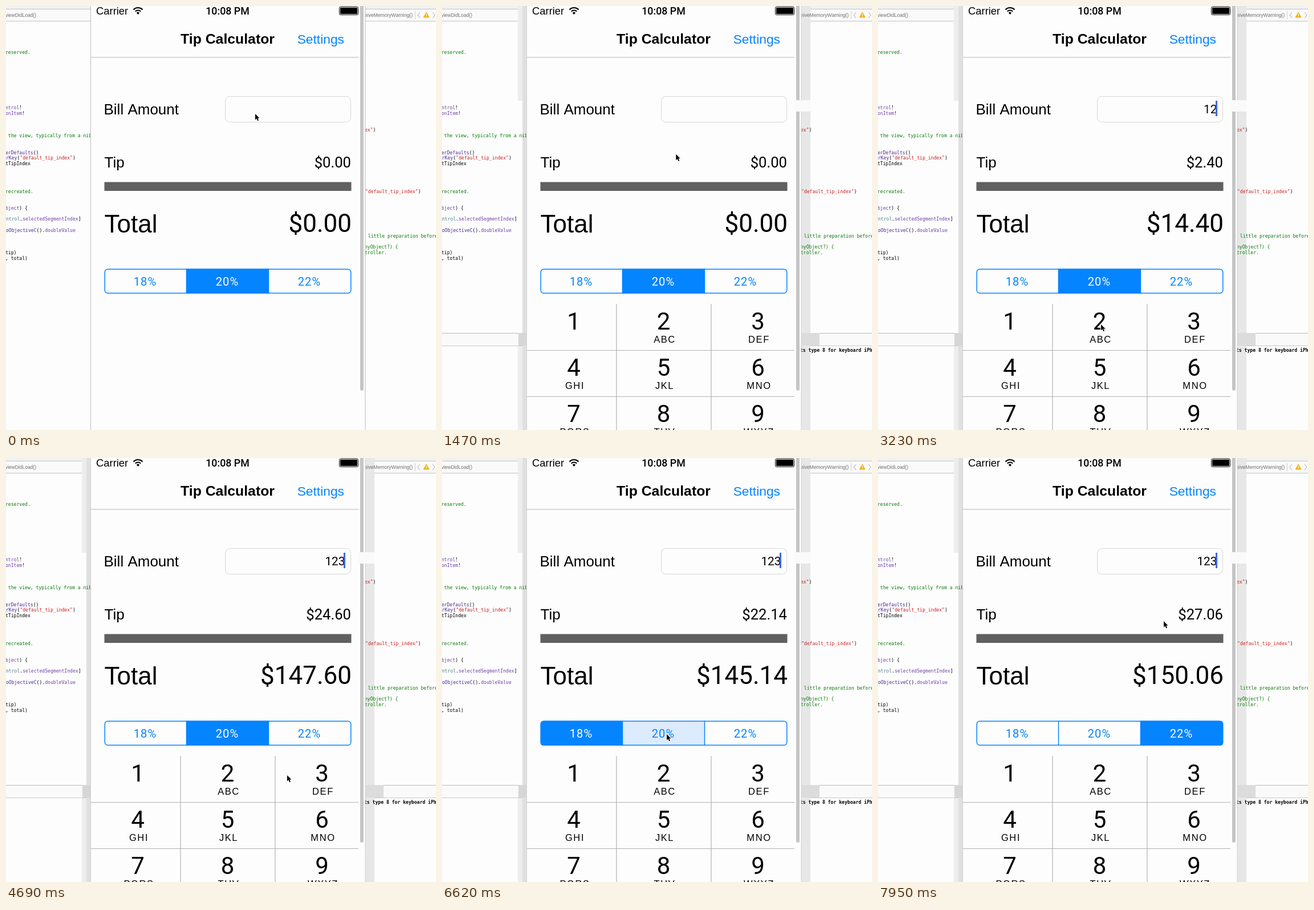
Write an HTML page with a canvas that moves like this. It is 754 px wide and 743 px high and loops after 8 s.

```html
<!DOCTYPE html>
<html lang="en">
<head>
<meta charset="utf-8">
<title>Tip Calculator</title>
<style>
html, body { margin: 0; width: 100%; height: 100%; overflow: hidden; background: #fdfdfd; }
canvas { display: block; }
</style>
</head>
<body>
<canvas id="stage" width="754" height="743"></canvas>
<script>
const c = document.getElementById('stage').getContext('2d');
const LOOP = 8000, STEP = 147.1;
const SANS = '"Liberation Sans", Arial, sans-serif';
const DIGITS = 'Roboto, sans-serif';
const MONO = '"DejaVu Sans Mono", monospace';
const PAPER = '#fdfdfd', BLUE = '#0584ff', BLACK = '#000';
const GREEN = '#0a7a0a', PURPLE = '#4a2796', LILAC = '#7040a8', RED = '#c82020';

// Pointer stops: time, x, y
const POINTER = [
  [0, 437, 189], [147, 438, 189], [441, 438, 189], [588, 450, 185], [1180, 450, 185],
  [2200, 249, 563], [2500, 249, 563], [2790, 391, 558], [3400, 391, 558],
  [4300, 493, 556], [4710, 493, 556], [5740, 272, 484], [5880, 245, 484],
  [6180, 245, 484], [6520, 394, 484], [6800, 394, 484], [7200, 533, 484],
  [7360, 533, 484], [7940, 501, 286]
];
const FOCUS = 5;
const KEY_DOWN = [16, 21, 31], KEY_UP = [17, 22, 32];
const TAP_DOWN = [41, 45, 49], TAP_UP = [42, 46, 50];
const RATES = [18, 20, 22];

// Code lines: x, y, then text and colour pairs
const CODE = [
  [-1, 81, 'reserved.', GREEN],
  [-1, 178, 'ntrol', LILAC, '!', BLACK],
  [-1, 188, 'onItem', LILAC, '!', BLACK],
  [-1, 227, ' the view, typically from a nib.', GREEN],
  [-1, 257, 'erDefaults', PURPLE, '()', BLACK],
  [0, 266, 'rKey', PURPLE, '(', BLACK, '"default_tip_index"', RED, ')', BLACK],
  [-1, 276, 'tTipIndex', BLACK],
  [-1, 325, 'recreated.', GREEN],
  [-1, 354, 'bject', LILAC, ') {', BLACK],
  [0, 373, 'ntrol', '#4f8187', '.', BLACK, 'selectedSegmentIndex', LILAC, ']', BLACK],
  [0, 393, 'oObjectiveC', PURPLE, '().', BLACK, 'doubleValue', LILAC],
  [-1, 432, 'tip)', BLACK],
  [-1, 442, ', total)', BLACK],
  [629, 217, 'ex"', RED, ')', BLACK],
  [630, 325, '"default_tip_index"', RED, ')', BLACK],
  [630, 403, ' little preparation before', GREEN],
  [629, 422, 'nyObject?) {', GREEN],
  [629, 432, 'troller.', GREEN]
];

function box(x, y, w, h, color) {
  c.fillStyle = color;
  c.fillRect(x, y, w, h);
}

function text(str, x, y, size, { color = BLACK, align = 'left', weight = '', space = 0, font = SANS } = {}) {
  c.font = `${weight} ${size}px ${font}`;
  c.textAlign = align;
  c.letterSpacing = space + 'px';
  c.fillStyle = color;
  c.fillText(str, x, y);
}

function path(points, x = 0, y = 0) {
  c.beginPath();
  for (const [px, py] of points) c.lineTo(x + px, y + py);
}

function roundBox(x, y, w, h, r) {
  c.beginPath();
  c.roundRect(x, y, w, h, r);
}

function drawEditor(open) {
  for (const [x, w] of [[0, 148], [629, 125]]) {
    box(x, 0, w, 5, '#f1f1f1');
    box(x, 5, w, 1, '#c4c4c4');
    box(x, 6, w, 20, '#fafafa');
    box(x, 26, w, 1, '#c2c2c2');
    if (open) {
      box(x, 573, w, 1, '#b9b9b9');
      box(x, 574, w, 21, '#fafafa');
      box(x, 595, w, 1, '#c9c9c9');
    }
  }
  if (open) {
    box(133, 0, 8, 166, '#ededed');
    box(141, 0, 8, 743, '#e0e0e0');
    box(134, 573, 14, 22, '#d6d6d6');
    box(133, 596, 8, 147, '#ededed');
    box(630, 0, 16, 165, '#e7e7e7');
    box(630, 185, 16, 558, '#e7e7e7');
    box(630, 573, 32, 22, '#dcdcdc');
    text('ts type 8 for keyboard iPhone', 628, 606, 8.1, { weight: 'bold', font: MONO });
  }
  text('viewDidLoad()', 53, 19, 8.5, { color: '#6e6e6e', align: 'right' });
  text('didReceiveMemoryWarning()', 713, 19, 8.6, { color: '#6e6e6e', align: 'right' });
  box(717, 9, 1, 14, '#d0d0d0');
  c.strokeStyle = '#a8a8a8';
  c.lineWidth = 1;
  path([[726, 11], [722, 16], [726, 21]]);
  c.stroke();
  path([[748, 11], [752, 16], [748, 21]]);
  c.stroke();
  path([[737, 11], [742, 20], [732, 20]]);
  c.closePath();
  c.fillStyle = c.strokeStyle = '#f5b400';
  c.lineJoin = 'round';
  c.fill();
  c.stroke();
  box(736.5, 13.5, 1.2, 3.5, '#fff');
  box(736.5, 18, 1.2, 1.2, '#fff');

  for (const [x, y, ...runs] of CODE) {
    let left = x;
    for (let i = 0; i < runs.length; i += 2) {
      text(runs[i], left, y + 3, 8.1, { color: runs[i + 1], font: MONO });
      left += c.measureText(runs[i]).width;
    }
  }
}

function drawPhone(open) {
  box(148, 0, 482, 743, PAPER);
  box(148, 0, 1, 743, open ? '#d2d2d2' : '#bcbcbc');
  box(629.5, 0, 1, 743, open ? '#d2d2d2' : '#bcbcbc');
  c.fillStyle = '#c5c5c5';
  roundBox(621, -10, 6, 684, 3);
  c.fill();
  if (open) box(618, 165, 28, 20, '#fafafa');

  text('Carrier', 158, 15, 18.4);
  text('10:08 PM', 388.5, 15, 17.8, { weight: 500, align: 'center', font: DIGITS });
  c.strokeStyle = BLACK;
  c.lineWidth = 2.2;
  for (const r of [6.5, 11]) {
    c.beginPath();
    c.arc(231.5, 14, r, -Math.PI * 0.76, -Math.PI * 0.24);
    c.stroke();
  }
  c.beginPath();
  c.moveTo(231.5, 15);
  c.arc(231.5, 14, 3.4, -Math.PI * 0.78, -Math.PI * 0.22);
  c.fillStyle = BLACK;
  c.fill();
  c.lineWidth = 1;
  roundBox(584.5, 1.5, 33, 14, 2);
  c.stroke();
  box(586, 3, 30, 11, BLACK);

  text('Tip Calculator', 388.5, 65.5, 24.8, { weight: 'bold', align: 'center' });
  text('Settings', 593, 65.5, 22.8, { color: BLUE, align: 'right' });
  box(149, 89.5, 469, 1, '#b4b4b4');
}

function drawForm(bill, rate, pressed, caret) {
  const amount = { align: 'right', font: DIGITS };
  const tip = bill * rate / 100;
  text('Bill Amount', 171.5, 189.5, 26);
  c.strokeStyle = '#d6d6d6';
  c.lineWidth = 1;
  roundBox(384.5, 158.5, 220, 45, 8);
  c.stroke();
  text(bill, 594.5, 188, 20.8, amount);
  if (caret) box(592, 166, 3, 27, '#4169e1');

  text('Tip', 172.5, 282.5, 26);
  text('$' + tip.toFixed(2), 605, 282.5, 25.6, amount);
  box(172.5, 308.5, 433, 15.5, '#606060');
  text('Total', 172.5, 397, 44);
  text('$' + (+bill + tip).toFixed(2), 606, 396, 44, amount);

  c.save();
  roundBox(172.5, 460.5, 433, 43.5, 5.5);
  c.clip();
  RATES.forEach((r, i) => {
    const x = 172.5 + i * 144, on = r === rate;
    if (on || r === pressed) box(x, 460, 144.5, 44, on ? BLUE : '#dcebfd');
    if (i) box(x - 0.75, 460, 1.5, 44, BLUE);
    text(r + '%', x + 71.5, 489.5, 20.2, {
      color: on ? '#fff' : BLUE, align: 'center', space: 1, font: DIGITS
    });
  });
  c.restore();
  c.strokeStyle = BLUE;
  c.lineWidth = 1.5;
  roundBox(173.25, 461.25, 431.5, 42, 5);
  c.stroke();
}

function drawKeypad(offset, pressed) {
  const letters = ['', 'ABC', 'DEF', 'GHI', 'JKL', 'MNO', 'PQRS', 'TUV', 'WXYZ'];
  const edges = [149, 306, 472, 618], centers = [231, 388.5, 554];
  const top = 522 + offset;
  box(149, top, 469, 743, PAPER);
  if (pressed) box(edges[pressed - 1], top, edges[pressed] - edges[pressed - 1], 82, '#d4d7df');
  letters.forEach((label, i) => {
    const x = centers[i % 3], y = top + 81 * Math.floor(i / 3);
    text(i + 1, x, y + 45, 42, { align: 'center', font: DIGITS });
    text(label, x + 2, y + 68, 16.5, { align: 'center', space: 1.6 });
  });
  for (const y of [81, 162]) box(149, top + y, 469, 1, '#b2b2b2');
  for (const x of [305.5, 471.5]) box(x, top, 1, 743, '#a4a4a4');
}

function drawPointer(t) {
  let i = POINTER.findIndex(p => p[0] > t);
  if (i < 0) i = POINTER.length - 1;
  const [t0, x0, y0] = POINTER[i - 1], [t1, x1, y1] = POINTER[i];
  const k = Math.min(1, (t - t0) / (t1 - t0));
  const e = k * k * (3 - 2 * k);
  path([[0, 0], [0, 10.5], [2.5, 8.3], [4.2, 12.2], [6, 11.4], [4.4, 7.6], [7.5, 7.4]],
    x0 + (x1 - x0) * e, y0 + (y1 - y0) * e);
  c.closePath();
  c.strokeStyle = '#fff';
  c.lineWidth = 2;
  c.stroke();
  c.fillStyle = BLACK;
  c.fill();
}

function draw(time) {
  const n = Math.floor((time + 24) / STEP), t = n * STEP;
  const open = n >= FOCUS;
  const bill = '123'.slice(0, KEY_UP.filter(k => n >= k).length);
  const taps = TAP_UP.filter(k => n >= k).length;
  const rate = taps ? RATES[taps - 1] : 20;
  const reset = Math.max(FOCUS, ...KEY_UP.filter(k => n >= k));
  const caret = open && (t - reset * STEP + 100) % 1000 < 750;

  box(0, 0, 754, 743, PAPER);
  drawEditor(open);
  drawPhone(open);
  drawForm(bill, rate, RATES[TAP_DOWN.indexOf(n)], caret);
  if (open) {
    const rise = Math.min(1, (n - FOCUS) / 2);
    drawKeypad(Math.round(221 * (1 - rise) ** 1.72), KEY_DOWN.indexOf(n) + 1);
  }
  drawPointer(t);
}

const start = performance.now();
function tick() {
  draw((performance.now() - start) % LOOP);
  requestAnimationFrame(tick);
}
tick();
</script>
</body>
</html>
```
